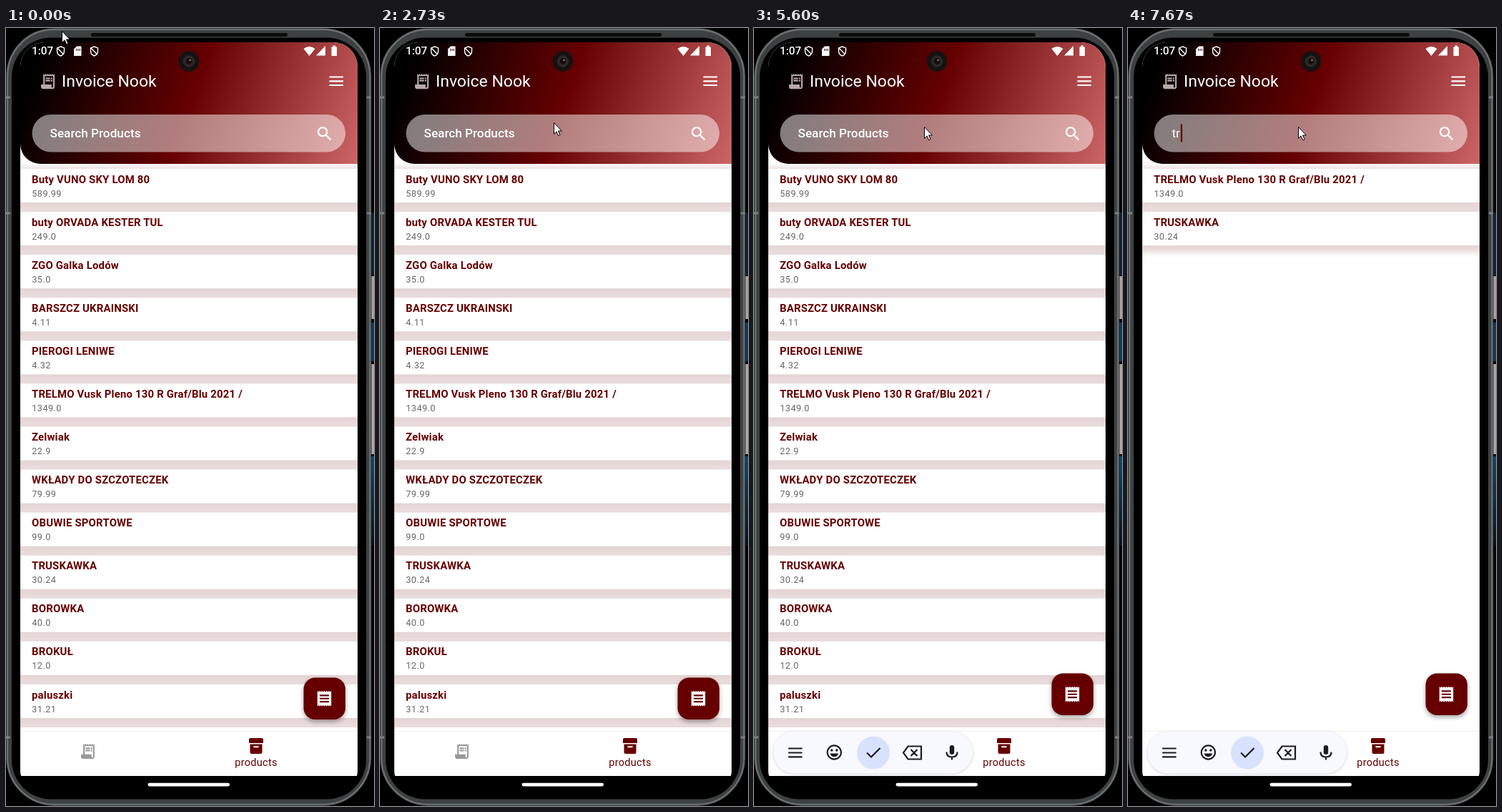
These frames come from a looping animation (515 by 1088 pixels, 8 s). An HTML page:

```html
<!DOCTYPE html>
<html lang="en">
<head>
<meta charset="utf-8">
<title>Receipt list search</title>
<style>
  html, body { margin: 0; width: 100%; height: 100%; overflow: hidden; background: #000; }
  svg { display: block; width: 100%; height: 100%; font-family: Roboto, sans-serif; }
  .name { font-size: 14.92px; font-weight: 700; letter-spacing: .19px; fill: #600; }
  .price { font-size: 12.63px; letter-spacing: .46px; fill: #666; }
  .glow { fill: #600; fill-opacity: .17; filter: blur(4px); }
  .fab { fill: #600; filter: drop-shadow(0 3px 3px rgba(0, 0, 0, .35)); }
  .pill { fill: #f8f8ff; filter: drop-shadow(0 1px 2px rgba(60, 60, 90, .22)); }
  .line { fill: none; stroke: #1b1c20; stroke-width: 2.2; }
</style>
</head>
<body>
<svg viewBox="0 0 515 1088" preserveAspectRatio="none">
  <defs>
    <linearGradient id="head" gradientUnits="userSpaceOnUse" x1="20" y1="20" x2="492" y2="190">
      <stop offset=".06" stop-color="#000"/>
      <stop offset=".5" stop-color="#600"/>
      <stop offset="1" stop-color="#c66"/>
    </linearGradient>
    <linearGradient id="sea" x2="0" y2="1">
      <stop offset="0" stop-color="#0b4a78"/>
      <stop offset="1" stop-color="#04101c"/>
    </linearGradient>
    <clipPath id="screen"><rect x="20" y="20" width="472" height="1051" rx="34"/></clipPath>
    <clipPath id="listArea"><rect x="20" y="150" width="472" height="834"/></clipPath>
    <path id="long" d="M19.5 3.5L18 2l-1.5 1.5L15 2l-1.5 1.5L12 2l-1.5 1.5L9 2 7.5 3.5 6 2v14H3v3c0 1.66 1.34 3 3 3h12c1.66 0 3-1.34 3-3V2zM19 19c0 .55-.45 1-1 1s-1-.45-1-1v-3H8V5h11zM9 7h6v2H9zM16 7h2v2h-2zM9 10h6v2H9zM16 10h2v2h-2z"/>
    <path id="shield" fill="none" stroke="#fff" stroke-width="1.4" d="M0-6.500L5-4.600V-.5C5 3 2.800 5.500 0 6.500C-2.800 5.500-5 3-5-.5V-4.600zM-4.500-4.500L3.600 4"/>
  </defs>

  <!-- backdrop showing at the right edge -->
  <rect width="515" height="1088"/>
  <rect x="505" y="258" width="10" height="88" fill="#0a2238"/>
  <rect x="505" y="347" width="10" height="60" fill="#aaa29f"/>
  <rect x="505" y="412" width="10" height="54" fill="#0b3d60"/>
  <rect x="505" y="470" width="10" height="126" fill="#aea6a3"/>
  <rect x="505" y="599" width="10" height="125" fill="url(#sea)"/>

  <!-- phone body -->
  <rect x="0" y="0" width="511.500" height="1088" rx="67" fill="#1c1e1e"/>
  <rect x="2" y="2" width="507.500" height="1084" rx="65" fill="#3d4141" stroke="#6a6f6f" stroke-width="2.500"/>
  <rect x="119" y="7" width="275" height="5" rx="2.500" fill="#0b0c0c"/>
  <rect x="8" y="13.500" width="496" height="1065" rx="55"/>
  <path d="M0 97H6M0 259H6M0 992H6M505 97H511M505 259H511M505 992H511" stroke="#7b8080" stroke-width="3"/>

  <g clip-path="url(#screen)">
    <rect x="20" y="20" width="472" height="1026" fill="#fff"/>
    <g id="list" clip-path="url(#listArea)"></g>
    <path d="M20 20H492V190H48A28 28 0 0 1 20 162z" fill="url(#head)"/>

    <!-- status bar -->
    <text x="36" y="37.300" font-size="15.300" font-weight="500" fill="#fff">1:07</text>
    <use href="#shield" x="76.500" y="32.500"/>
    <path d="M99 25.500h6.500v13.500H95V29.500z" fill="#fff"/>
    <path d="M98.700 29v3M101 29v3M103.300 29v3" stroke="#300"/>
    <use href="#shield" x="123.500" y="32.500"/>
    <path d="M416.500 29Q424.500 23 432.500 29L424.500 39zM447 25V38.500H434zM455.500 26.500H457.500V24.500H461V26.500H463V39H455.500z" fill="#fff"/>

    <!-- header -->
    <use href="#long" fill="#b9a9a9" transform="translate(45.800 62) scale(1.06)"/>
    <text x="78" y="82" font-size="22.960" fill="#fff">Invoice Nook</text>
    <path d="M452.500 68.500H472M452.500 74.300H472M452.500 80H472" stroke="#fff" stroke-width="2.200"/>
    <rect x="36.500" y="121" width="438.500" height="52.500" rx="26.250" fill="#fff" fill-opacity=".49"/>
    <text id="query" x="61.500" y="152.700" font-size="17.200" fill="#fff"></text>
    <rect id="caret" x="61.600" y="134.500" width="2.200" height="25" fill="#600"/>
    <path transform="translate(432.700 134.700) scale(1.1)" fill="#fff" d="M15.500 14h-.79l-.28-.27C15.410 12.590 16 11.110 16 9.500 16 5.910 13.090 3 9.500 3S3 5.910 3 9.500 5.910 16 9.500 16c1.610 0 3.090-.59 4.230-1.570l.27.280v.79l5 4.990L20.490 19zM9.500 14C7.010 14 5 11.990 5 9.500S7.010 5 9.500 5 14 7.010 14 9.500 11.990 14 9.500 14z"/>

    <!-- bottom navigation -->
    <rect x="20" y="983.500" width="472" height="62.500" fill="#fff"/>
    <path d="M20 983.500H492" stroke="#f3eeee"/>
    <use href="#long" fill="#999" transform="translate(101.800 999) scale(1.05)"/>
    <path fill="#600" fill-rule="evenodd" d="M342 993h16q2 0 2 2v5h-20v-5q0-2 2-2zM341.500 1001.500h17v11.500q0 2-2 2h-13q-2 0-2-2zM346.500 1004v2.300h7V1004z"/>
    <text x="350" y="1032.300" font-size="14.500" letter-spacing=".3" text-anchor="middle" fill="#600">products</text>

    <g id="fab">
      <rect class="fab" x="416.500" y="908.500" width="58.500" height="58.500" rx="16"/>
      <path transform="translate(432.500 924.800) scale(1.08)" fill="#fff" d="M18 17H6v-2h12zM18 13H6v-2h12zM18 9H6V7h12zM3 22l1.500-1.500L6 22l1.500-1.500L9 22l1.500-1.500L12 22l1.500-1.500L15 22l1.500-1.500L18 22l1.500-1.500L21 22V2l-1.500 1.500L18 2l-1.500 1.500L15 2l-1.500 1.500L12 2l-1.500 1.500L9 2 7.500 3.500 6 2 4.500 3.500 3 2z"/>
    </g>

    <!-- input toolbar -->
    <g id="toolbar">
      <rect class="pill" x="27" y="983.500" width="279" height="59" rx="29.500"/>
      <path class="line" d="M48 1007.500H67.500M48 1013.500H67.500M48 1019.300H67.500"/>
      <circle class="line" cx="112.300" cy="1013" r="9.600"/>
      <path d="M106.500 1014.500h11.600q-1.600 4.800-5.800 4.800t-5.800-4.800z" fill="#1b1c20"/>
      <circle cx="108.800" cy="1010" r="1.800" fill="#1b1c20"/>
      <circle cx="115.800" cy="1010" r="1.800" fill="#1b1c20"/>
      <circle cx="167" cy="1013.500" r="23" fill="#d8e2ff"/>
      <path class="line" d="M158 1013.500l6 6 12.500-12.500"/>
      <path class="line" d="M215.500 1004.500H234V1022.500H215.500L209 1013.500zM219.500 1009l9 9M228.500 1009l-9 9"/>
      <rect x="273.800" y="1003" width="6.400" height="13" rx="3.200" fill="#1b1c20"/>
      <path class="line" d="M269.500 1012.500q0 7 7.500 7t7.500-7M277 1019.500v4"/>
    </g>
    <rect x="198.500" y="1055.800" width="114.500" height="4.600" rx="2.300" fill="#fff"/>
  </g>

  <!-- camera -->
  <circle cx="256" cy="46.500" r="14.300" fill="#141212"/>
  <circle cx="256" cy="46.500" r="7.500" fill="#2b2524" stroke="#3a302e"/>
  <circle cx="256" cy="46.500" r="4" fill="#120c0c"/>
  <circle cx="257.500" cy="45" r="1.300" fill="#8a7a74"/>

  <path id="pointer" d="M.5.5V16.300L4.100 12.900L6.600 18.700L9 17.700L6.500 12H11.300z" fill="#fff" stroke="#000" stroke-linejoin="round"/>
</svg>

<script>
const LOOP = 8000, FPS = 15;
const $ = id => document.getElementById(id);

const products = [
  ['Buty VUNO SKY LOM 80', '589.99'],
  ['buty ORVADA KESTER TUL', '249.0'],
  ['ZGO Galka Lodów', '35.0'],
  ['BARSZCZ UKRAINSKI', '4.11'],
  ['PIEROGI LENIWE', '4.32'],
  ['TRELMO Vusk Pleno 130 R Graf/Blu 2021 /', '1349.0'],
  ['Zelwiak', '22.9'],
  ['WKŁADY DO SZCZOTECZEK', '79.99'],
  ['OBUWIE SPORTOWE', '99.0'],
  ['TRUSKAWKA', '30.24'],
  ['BOROWKA', '40.0'],
  ['BROKUŁ', '12.0'],
  ['paluszki', '31.21'],
  ['', '']
];

// [time, x, y], eased between entries
const pointerPath = [
  [0, 78, 4], [933, 78, 4], [1867, 167, 244], [1933, 167, 244], [2400, 251, 141],
  [2667, 229, 155], [2733, 243, 132], [3400, 243, 132], [3467, 251, 155], [3533, 238, 138]
];

// [time, value], held until the next entry
const typed = [[0, ''], [7330, 't'], [7670, 'tr']];
const caretOn = [[0, 0], [4400, 1], [4670, 0], [5270, 1], [5600, 0], [6070, 1], [6530, 0], [7070, 1]];
const toolbarDrop = [[0, 110], [4670, 86], [4730, 62], [4800, 34], [4870, 14], [4930, 3], [5000, -1], [5270, 0]];
const fabLift = [[0, 0], [4870, 1], [4930, 2], [5000, 3], [5070, 4], [5270, 5], [5330, 6]];

const held = (keys, t) => keys.filter(k => k[0] <= t).pop()[1];

function eased(keys, t) {
  const i = keys.findIndex(k => k[0] > t);
  if (i < 0) return keys[keys.length - 1].slice(1);
  const [t0, x0, y0] = keys[i - 1], [t1, x1, y1] = keys[i];
  const u = (t - t0) / (t1 - t0), e = u * u * (3 - 2 * u);
  return [x0 + (x1 - x0) * e, y0 + (y1 - y0) * e];
}

let shownQuery = null;
function showQuery(query) {
  if (query === shownQuery) return;
  shownQuery = query;
  const rows = products.filter(([name]) => name.toLowerCase().includes(query));
  $('list').innerHTML = rows.map(([name, price], i) => `
    <g transform="translate(0 ${i * 60.08})">
      <rect class="glow" x="0" y="194.700" width="512" height="58.500"/>
      <rect x="20" y="197" width="472" height="47" fill="#fff"/>
      <text class="name" x="36" y="216.600">${name}</text>
      <text class="price" x="36.300" y="235.600">${price}</text>
    </g>`).join('');
  const label = $('query');
  label.textContent = query || 'Search Products';
  label.setAttribute('font-weight', query ? 400 : 500);
  $('caret').setAttribute('x', query ? 62.300 + label.getComputedTextLength() : 61.600);
}

function render(t) {
  const stepped = Math.floor((t + 4) * FPS / 1000) * 1000 / FPS;
  const [x, y] = eased(pointerPath, stepped);
  $('pointer').setAttribute('transform', `translate(${Math.round(x)} ${Math.round(y)})`);
  $('toolbar').setAttribute('transform', `translate(0 ${held(toolbarDrop, t)})`);
  $('fab').setAttribute('transform', `translate(0 ${-held(fabLift, t)})`);
  $('caret').setAttribute('opacity', held(caretOn, t));
  showQuery(held(typed, t));
}

const start = performance.now();
function tick() {
  render((performance.now() - start) % LOOP);
  requestAnimationFrame(tick);
}
tick();
</script>
</body>
</html>
```
